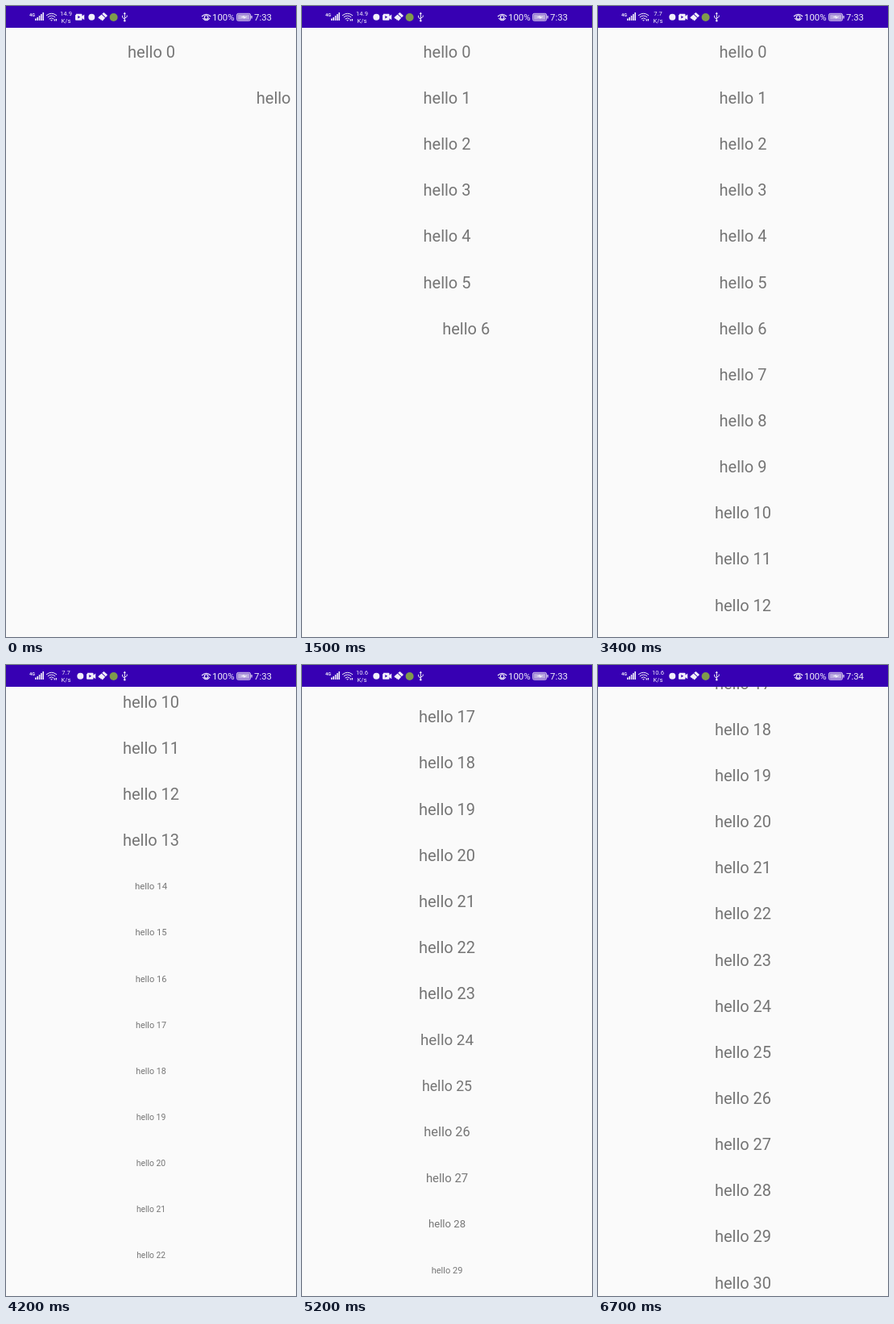
Write an HTML page that moves like this. It is 360 px wide and 782 px high and loops after 6.8 s.

```html
<!DOCTYPE html>
<html lang="en">
<head>
<meta charset="utf-8">
<title>List entrance animation</title>
<style>
  html, body { margin: 0; width: 100%; height: 100%; overflow: hidden; background: #fafafa; }
  svg { display: block; width: 360px; height: 782px; font-family: Roboto, sans-serif; }
  #list { font-size: 20px; fill: #757575; text-anchor: middle; }
  #bar text { fill: #f2effa; }
</style>
</head>
<body>
<svg viewBox="0 0 360 782">
  <rect width="360" height="782" fill="#fafafa"/>
  <g id="list"></g>
  <g id="bar" fill="#f2effa">
    <rect width="360" height="27" fill="#3700b3"/>
    <text x="29" y="13" font-size="5.6" font-weight="700">4G</text>
    <path d="M36 15.5h1.6V18H36zM38.4 14h1.6v4h-1.6zM40.8 12h1.6v6h-1.6zM43.1 10h1.6v8h-1.6zM45.4 8H47v10h-1.6z"/>
    <path d="M50 11.9Q56.5 6.6 63 11.9M51.8 14Q56.5 10.1 61.2 14M53.6 16.1Q56.5 13.7 59.4 16.1" fill="none" stroke="#f2effa"/>
    <path d="M55 17.2h3l-1.5 1.6zM59.6 16.4h1.3v2.2h-1.3zM61.7 16h1.3v2.6h-1.3z"/>
    <g font-size="7.6" text-anchor="middle">
      <text id="speed" x="74.5" y="12.3"></text>
      <text x="74.5" y="21.3">K/s</text>
    </g>
    <path id="camera" d="M1 9.8h6.5q1 0 1 1v1.6l2.7-2v6.8l-2.7-2v1.6q0 1-1 1H1q-1 0-1-1v-5q0-1 1-1zM3.3 12v3.6l2.8-1.8z" fill-rule="evenodd"/>
    <circle id="badge" cx="5.3" cy="13.8" r="4"/>
    <path d="M121.5 8l4.5 4-2.2 2.2-4.6-4.4zM118.6 10.4l4.6 4.4-3.4 3.8-1.2-1.4-1 .4-.7-1.6-1.2.2-.4-1.5-1.3-.2z"/>
    <circle cx="133.6" cy="14" r="5" fill="#7f9a4c"/>
    <path d="M147.3 9.5V18M144.5 11.8v2q0 1 2.8 2.2M150.2 11.5v1.6q0 1-2.9 2" fill="none" stroke="#f2effa"/>
    <path d="M147.3 7.6l1.6 2.4h-3.2z"/>
    <circle cx="147.3" cy="18.2" r="1.2"/>
    <g fill="none" stroke="#f2effa" stroke-width="1.1">
      <path d="M243 13Q248.6 7.4 254.2 13M244.2 15.2q4.4 5 8.8 0"/>
      <circle cx="248.6" cy="14" r="2.3"/>
    </g>
    <text x="256" y="17.8" font-size="11.4">100%</text>
    <rect x="286.5" y="9.3" width="17" height="9" rx="1.8" fill="#8a66cf" stroke="#c9bbe8"/>
    <rect x="288" y="10.8" width="14" height="6" rx=".6" fill="#b9a8df"/>
    <path d="M304.4 12h1.2v3.6h-1.2z"/>
    <path d="M291 14l4.7-2v1.3h4L295 15.8v-1.4z"/>
    <text id="clock" x="308" y="17.8" font-size="11.4"></text>
  </g>
</svg>
<script>
const LOOP = 6800, PITCH = 57.15, WIDTH = 360, COUNT = 32, BASELINE = 63.8, MIDDLE = 56.5;
const SLIDE = 600, STAGGER = 264, FIRST = -584;   // entrance timing, ms
const GROW = 1000, BIND = 744;                    // rows met while scrolling

const $ = id => document.getElementById(id);
const clamp = x => Math.min(1, Math.max(0, x));
const ease = x => (1 - Math.cos(Math.PI * clamp(x))) / 2;

// Scroll position: two swipes, [ms, px]
const keys = [
  [3600, 0], [3880, 20], [3950, 56], [4010, 228], [4060, 342], [4110, 510],
  [4200, 582], [4300, 606], [4390, 614], [4425, 628], [4517, 685], [4820, 856],
  [4990, 913], [5200, 964], [5600, 993.5], [6000, 1003], [6300, 1005.7]
];
const slope = i => (keys[i + 1][1] - keys[i][1]) / (keys[i + 1][0] - keys[i][0]);
const tangents = keys.map((_, i) => {
  if (i === 0 || i === keys.length - 1) return 0;
  const a = slope(i - 1), b = slope(i);
  return 2 * a * b / (a + b);
});

function scrollAt(t) {
  if (t <= keys[0][0]) return 0;
  const i = keys.findIndex(k => k[0] > t) - 1;
  if (i < 0) return keys[keys.length - 1][1];
  const [t0, y0] = keys[i], [t1, y1] = keys[i + 1];
  const h = t1 - t0, u = (t - t0) / h, v = 1 - u;
  return y0 * v * v * (1 + 2 * u) + y1 * u * u * (3 - 2 * u)
    + h * u * v * (tangents[i] * v - tangents[i + 1] * u);
}

// Time at which a row enters from below
function bindTime(i) {
  const edge = i * PITCH - BIND;
  if (edge < 0) return -GROW;
  let t = keys[0][0];
  while (t < LOOP && scrollAt(t) < edge) t += 2;
  return t;
}

const rows = Array.from({ length: COUNT }, (_, i) => {
  const el = document.createElementNS($('list').namespaceURI, 'text');
  el.textContent = 'hello ' + i;
  el.setAttribute('y', BASELINE - MIDDLE);
  $('list').append(el);
  return { el, bound: bindTime(i) };
});

function draw(t) {
  const scroll = scrollAt(t);
  rows.forEach(({ el, bound }, i) => {
    const entered = ease((t - FIRST - i * STAGGER) / SLIDE);
    const x = WIDTH / 2 + (bound < 0 ? WIDTH * (1 - entered) : 0);
    const y = MIDDLE + i * PITCH - scroll;
    const scale = 0.5 + 0.5 * ease((t - bound) / GROW);
    el.setAttribute('transform', `translate(${x} ${y}) scale(${scale})`);
  });
  const swapped = t >= 300;
  $('camera').setAttribute('transform', `translate(${swapped ? 100 : 86} 0)`);
  $('badge').setAttribute('transform', `translate(${swapped ? 87 : 101} 0)`);
  $('speed').textContent = t < 1700 ? '14.9' : t < 4700 ? '7.7' : '10.6';
  $('clock').textContent = t < 6700 ? '7:33' : '7:34';
}

const start = performance.now();
function tick() {
  draw((performance.now() - start) % LOOP);
  requestAnimationFrame(tick);
}
tick();
</script>
</body>
</html>
```
